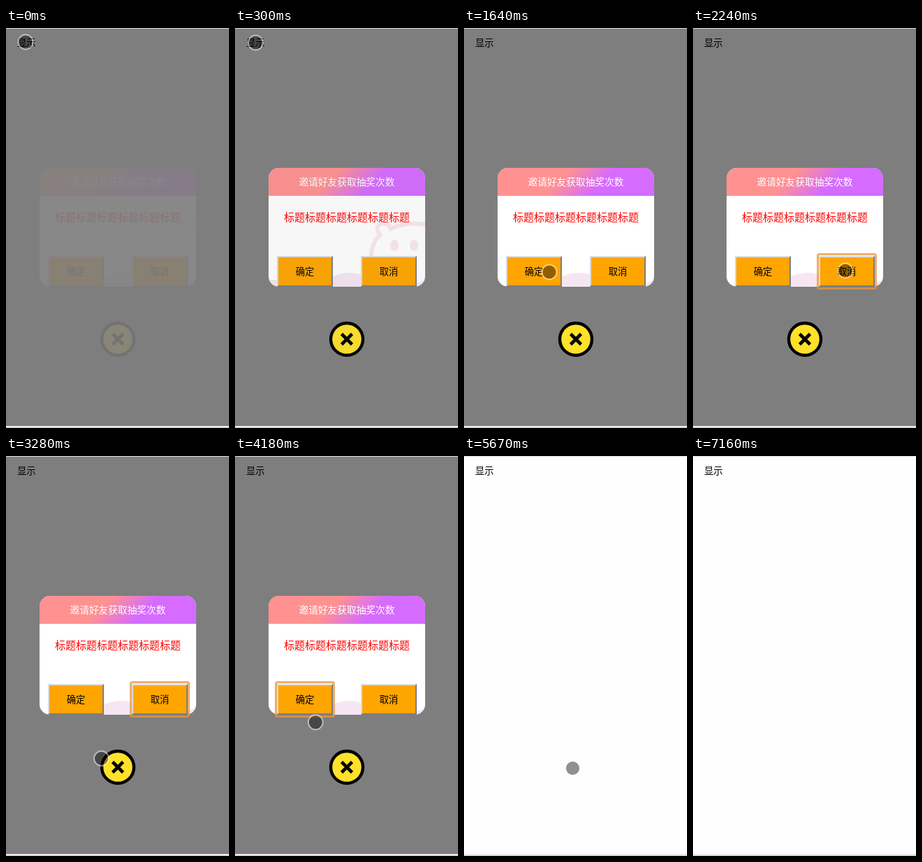
Animation of 319x572 px, one loop 7.45 s. Source, as an HTML page:

```html
<!DOCTYPE html>
<html lang="zh-CN">
<head>
<meta charset="utf-8">
<style>
html, body { margin: 0; width: 100%; height: 100%; overflow: hidden; background: #fefefe; }
svg { display: block; }
text { font: 13.33px "Noto Sans CJK SC", "Noto Sans CJK", "Noto Sans", sans-serif; }
.mid { text-anchor: middle; }
</style>
</head>
<body>
<svg width="319" height="572" viewBox="0 0 319 572">
  <defs>
    <!-- 135 degree sweep across the 224 x 40 header -->
    <linearGradient id="sweep" gradientUnits="userSpaceOnUse" x1="94" y1="154" x2="226" y2="286">
      <stop offset=".4" stop-color="#ff9191"/>
      <stop offset=".65" stop-color="#d56bff"/>
    </linearGradient>
    <clipPath id="card"><rect x="48" y="200" width="224" height="170" rx="15"/></clipPath>
    <filter id="soft"><feGaussianBlur stdDeviation=".6"/></filter>
    <g id="button">
      <path fill="#ffa500" d="M0 0h80v44H0z"/>
      <path fill="#dcdcdc" d="M0 0h80l-2 2H2v40l-2 2z"/>
      <path fill="#7d7d7d" d="M80 0v44H0l2-2h76V2z"/>
    </g>
  </defs>

  <path fill="#ddd" d="M0 0h319v1H0zM0 569h319v1H0z"/>
  <path fill="#bbb" d="M0 571h319v1H0z"/>
  <text x="16" y="26">显示</text>

  <g id="popup">
    <rect y="1" width="319" height="568" opacity=".5"/>
    <g id="dialog">
      <g clip-path="url(#card)">
        <path fill="#fff" d="M48 200h224v170H48z"/>
        <path fill="url(#sweep)" d="M48 200h224v40H48z"/>
        <g id="bear" fill="none" stroke="#fae8ea" stroke-width="6">
          <path d="M196 350Q190 310 208 296Q198 284 210 280Q220 278 223 287Q246 276 272 281"/>
          <g fill="#fae8ea" stroke="none">
            <ellipse cx="228" cy="311" rx="6" ry="8"/>
            <ellipse cx="256" cy="311" rx="6" ry="8"/>
          </g>
          <path fill="#f4e6f1" stroke="none" d="M48 360h14v10H48z"/>
        </g>
        <path fill="#f6e6f3" d="M130 360Q163 341 192 358V370H130zM258 366L272 360V370H258z"/>
      </g>
      <text class="mid" x="160" y="225" fill="#fff" style="font-size:13.7px">邀请好友获取抽奖次数</text>
      <text class="mid" x="160" y="276" fill="#f00" style="font-size:15px">标题标题标题标题标题标题</text>
      <rect id="ring" y="323.5" width="83" height="49" rx="2" fill="none"
            stroke="#e8943a" stroke-opacity=".75" stroke-width="3" filter="url(#soft)"/>
      <use href="#button" x="60" y="326"/>
      <use href="#button" x="180" y="326"/>
      <text class="mid" x="100" y="353">确定</text>
      <text class="mid" x="220" y="353">取消</text>
      <circle cx="160" cy="445" r="23" fill="#ffe12a" stroke="#000" stroke-width="4.4"/>
      <path d="M152.500 437.500l15 15m0-15l-15 15" stroke="#000" stroke-width="4.6"/>
    </g>
  </g>

  <g id="pointer">
    <circle r="9.700" fill-opacity=".43"/>
    <circle r="10.500" fill="none" stroke="#fff" stroke-opacity=".5" stroke-width="1.800"/>
  </g>
</svg>
<script>
const LOOP = 7450, TICK = 149;
const $ = id => document.getElementById(id);
const show = (id, on) => $(id).setAttribute('visibility', on ? 'visible' : 'hidden');

// pointer path: tick, x, y
const path = [
  [0, 28, 20], [1, 28, 20], [2, 29.5, 21], [7, 110, 342], [11, 122, 349],
  [13, 165, 384], [15, 218, 347], [18, 218, 347], [22, 136.5, 432.5],
  [24, 95, 347], [25, 95, 347], [33, 149, 437], [35, 155.5, 446.5],
  [38, 155.5, 446.5], [45, 210, 460], [47, 267, 557], [50, 267, 557]
];
const fadeIn = [.08, .6, .94];

function pointerAt(n) {
  const i = path.findIndex(p => p[0] > n);
  const [a, x0, y0] = path[i - 1], [b, x1, y1] = path[i];
  const k = (n - a) / (b - a);
  return [x0 + (x1 - x0) * k, y0 + (y1 - y0) * k];
}

function draw() {
  const t = performance.now() % LOOP;
  const n = Math.floor(Math.floor(t / 10) * 10 / TICK);
  const open = n < 38;
  $('popup').style.display = open ? '' : 'none';
  $('dialog').setAttribute('opacity', fadeIn[n] ?? 1);
  show('bear', n < 3);
  show('ring', n >= 15);
  $('ring').setAttribute('x', n < 26 ? 178.5 : 58.5);
  show('pointer', n < 48);
  $('pointer').setAttribute('transform', `translate(${pointerAt(n)})`);
  requestAnimationFrame(draw);
}
draw();
</script>
</body>
</html>
```
